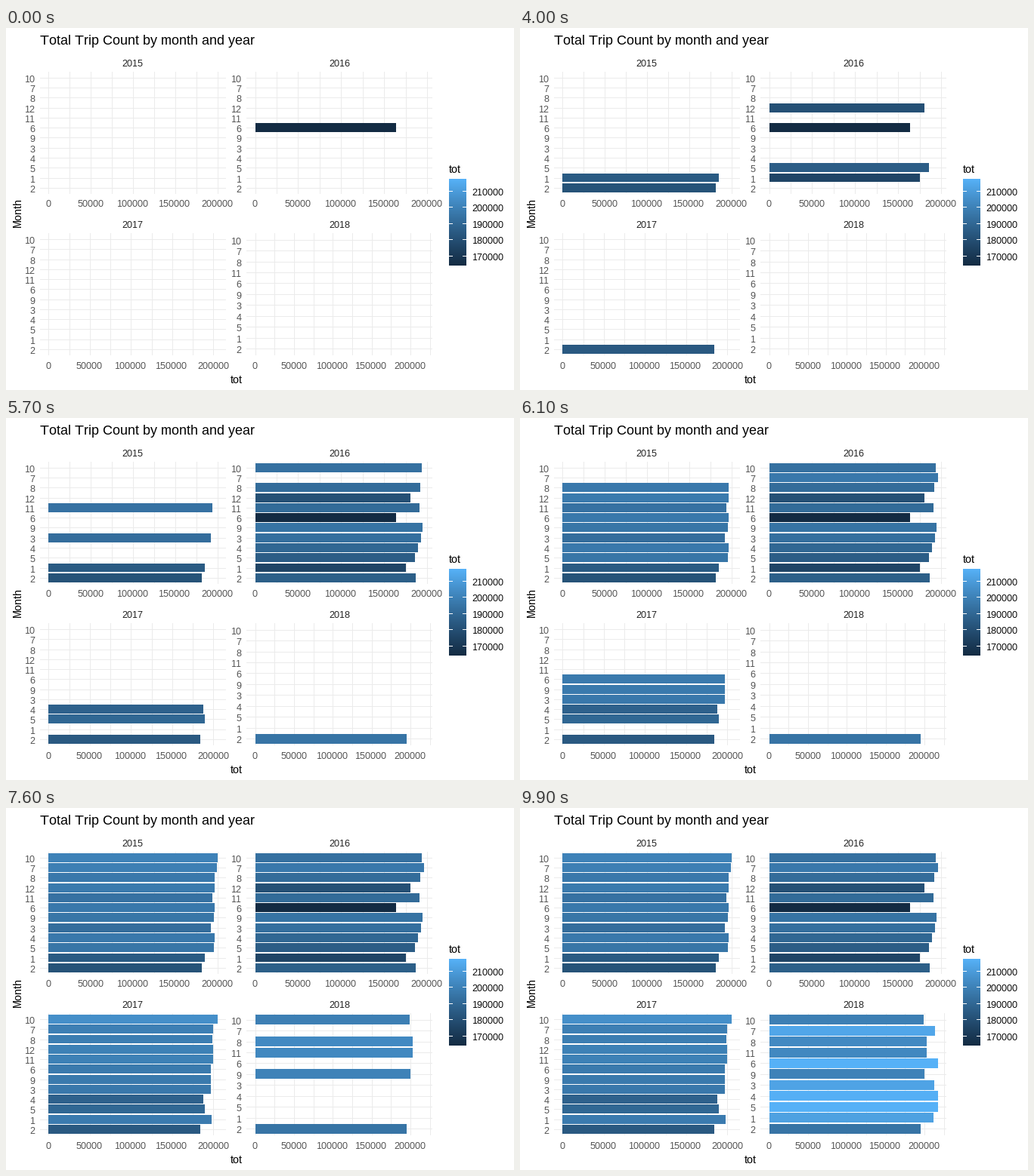
A matplotlib script that plays this animation: 672 by 480 pixels, repeating every 10000 ms.

```python
import numpy as np
import matplotlib.pyplot as plt
from matplotlib.animation import FuncAnimation
from matplotlib.patches import Rectangle

W, H, DPI = 672, 480, 96
FRAMES, STEP_MS = 100, 100
GRID, GREY, DARK = "#EBEBEB", "#4D4D4D", "#1A1A1A"

plt.rcParams.update({
    "font.family": "Liberation Sans",
    "text.hinting": "native",
    "text.hinting_factor": 1,
    "text.kerning_factor": 6,
})

# Totals run from VMIN to VMAX (thousands) and are revealed in rising order,
# so one rank from 0 to 99 gives a bar's start, length and colour.
VMIN, VMAX = 164.2, 217.7
MONTHS = [10, 7, 8, 12, 11, 6, 9, 3, 4, 5, 1, 2]
RANKS = {
    2015: [67, 65, 60, 61, 55, 60, 58, 52, 60, 58, 38, 32],
    2016: [54, 60, 51, 30, 50, 0, 56, 53, 47, 40, 21, 41],
    2017: [76, 65, 64, 66, 66, 61, 61, 60, 43, 47, 62, 37],
    2018: [65, 92, 72, 71, 99, 67, 90, 98, 99, 88, 57],
}

PANEL_W, PANEL_H = 246.0, 161.9
LEFT, TOP = 45.2, 57.84
COL_STEP, ROW_STEP = 273.2, 214.16


def total(rank):
    return VMIN + (VMAX - VMIN) * rank / (FRAMES - 1)


def share(v):
    return (v - VMIN) / (VMAX - VMIN)


def shade(t):
    """Dark to light blue, sagging a little like a blend in Lab space."""
    low, high = np.array([19, 43, 67]), np.array([86, 177, 247])
    sag = 4 * t * (1 - t) * np.array([2.5, 4, 5.5])
    return (low + t * (high - low) - sag) / 255


fig = plt.figure(figsize=(W / DPI, H / DPI), dpi=DPI, facecolor="white")
ax = fig.add_axes([0, 0, 1, 1])
ax.axis("off")


def snap(p):
    return np.floor(p + 0.5)


def box(x0, y0, x1, y1, color, z):
    x0, y0, x1, y1 = map(snap, (x0, y0, x1, y1))
    return ax.add_patch(Rectangle((x0, y0), x1 - x0, y1 - y0, color=color,
                                  lw=0, aa=False, snap=False, zorder=z))


def hline(x0, x1, y, color=GRID, z=1):
    box(x0, y, x1, snap(y) + 1, color, z)


def vline(x, y0, y1):
    box(x, y0, snap(x) + 1, y1, GRID, 1)


def label(x, y, s, px, color="black", ha="left", **kw):
    ax.text(x, y, s, fontsize=px * 72 / DPI, color=color, ha=ha,
            va="baseline", zorder=5, **kw)


def draw_panel(index, year):
    left = LEFT + index % 2 * COL_STEP
    top = TOP + index // 2 * ROW_STEP
    ranks = RANKS[year]
    months = [m for m in MONTHS if year < 2018 or m != 12]
    vmax = total(max(ranks))
    zero = left + PANEL_W / 22
    scale = PANEL_W / 1.1 / vmax
    row = PANEL_H / (len(months) + 0.2)

    label(left + PANEL_W / 2 - 0.4, top - 7, str(year), 12, DARK, "center")
    for k in range(0, int(vmax * 1.05) + 1, 25):
        x = zero + k * scale
        vline(x, top, top + PANEL_H)
        if k % 50 == 0:
            label(x - 0.4, top + 179.6, str(k * 1000), 12, GREY, "center")

    bars = []
    for i, (month, rank) in enumerate(zip(months, ranks)):
        y = top + (i + 0.6) * row
        hline(left, left + PANEL_W, y)
        label(left - 6.6, y + 6, str(month), 12, GREY, "right")
        bar = box(zero, y - 0.45 * row, zero + total(rank) * scale,
                  y + 0.45 * row, shade(rank / (FRAMES - 1)), 3)
        bars.append((rank, bar))
    return bars


def draw_legend():
    x0, x1, y0, y1 = 586, 609, 200, 315
    label(x0, 192, "tot", 15)
    ramp = [[shade(t)] for t in np.linspace(1, 0, y1 - y0)]
    ax.imshow(ramp, extent=(x0, x1, y1, y0), aspect="auto",
              interpolation="nearest", zorder=2)
    for k in range(170, 211, 10):
        y = y1 - share(k) * (y1 - y0)
        for a in (x0, x1 - 5):
            hline(a, a + 5, y - 0.6, "white", 4)
        label(616.5, y + 5, str(k * 1000), 12)


label(45, 22, "Total Trip Count by month and year", 18)
label(305, 471, "tot", 15, ha="center")
label(20, 244.5, "Month", 15, ha="center", rotation=90,
      rotation_mode="anchor")
draw_legend()
bars = [b for i, year in enumerate(RANKS) for b in draw_panel(i, year)]
ax.set_xlim(0, W)
ax.set_ylim(H, 0)


def update(frame):
    for start, bar in bars:
        bar.set_visible(frame >= start)
    return [bar for _, bar in bars]


anim = FuncAnimation(fig, update, frames=FRAMES, interval=STEP_MS,
                     init_func=lambda: update(0), repeat=True,
                     repeat_delay=0, blit=False)
plt.show()
```
